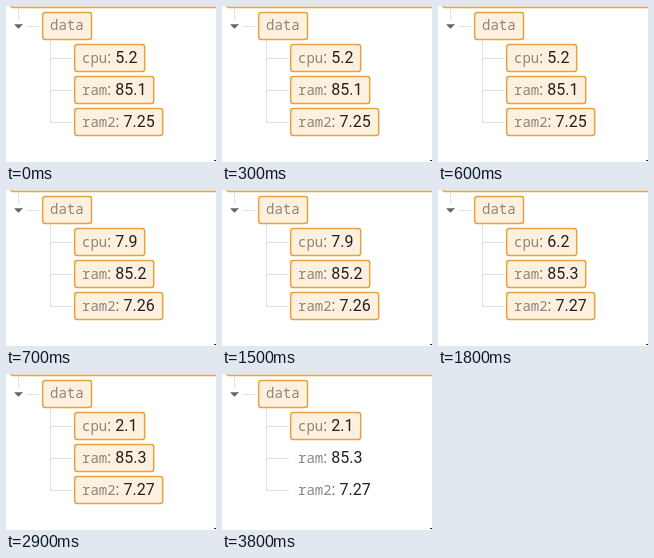
An HTML page that plays this animation: 210x156 px, repeating every 4000 ms.

```html
<!DOCTYPE html>
<html lang="en">
<head>
<meta charset="utf-8">
<style>
html, body { margin: 0; width: 100%; height: 100%; overflow: hidden; background: #fff; }
svg { display: block; width: 100%; height: 100%; }
.box { fill: #fdf0de; stroke: #e8a43c; stroke-width: 1.5; }
.line { fill: none; stroke: #e0e0e0; }
.key { font: 14px "Noto Sans Mono", monospace; fill: #8c857c; }
.val { font: 16px Roboto, sans-serif; fill: #212121; }
.colon { fill: #666; }
</style>
</head>
<body>
<svg viewBox="0 0 210 156">
  <path class="line" d="M12.5 3V14M22 20.5H33M44.5 34V116.5H67M44.5 52.5H67M44.5 84.5H67"/>
  <rect class="box" x="4.5" y="-24" width="230" height="25.4" rx="2.5"/>
  <path d="M8 18.3H17L12.5 22.8Z" fill="#666"/>
  <rect class="box" x="36.7" y="6.6" width="48.8" height="27" rx="2.5"/>
  <text class="key" x="44" y="24">data</text>
  <g id="rows"></g>
  <rect x="208" y="154" width="2" height="1" fill="#222"/>
</svg>
<script>
const LOOP = 4000;
const ROWS = [
  { key: 'cpu', width: 70, off: LOOP, vals: [[0, '5.2'], [700, '7.9'], [1800, '6.2'], [2900, '2.1']] },
  { key: 'ram', width: 79, off: 3800, vals: [[0, '85.1'], [700, '85.2'], [1800, '85.3']] },
  { key: 'ram2', width: 88, off: 3800, vals: [[0, '7.25'], [700, '7.26'], [1800, '7.27']] }
];
const CHAR = 8.4;

function add(parent, tag, attrs, text = '') {
  const el = document.createElementNS('http://www.w3.org/2000/svg', tag);
  for (const name in attrs) el.setAttribute(name, attrs[name]);
  el.textContent = text;
  return parent.appendChild(el);
}

const group = document.getElementById('rows');
ROWS.forEach((row, i) => {
  const y = 57 + i * 32;
  const end = 76 + row.key.length * CHAR;
  row.box = add(group, 'rect', { class: 'box', x: 68.7, y: y - 18.4, width: row.width, height: 27, rx: 2.5 });
  add(group, 'text', { class: 'key', x: 76, y }, row.key);
  add(group, 'text', { class: 'val colon', x: end, y }, ':');
  row.label = add(group, 'text', { class: 'val', x: end + 8, y });
});

function draw(t) {
  for (const row of ROWS) {
    const value = row.vals.filter(v => v[0] <= t).pop()[1];
    if (row.label.textContent !== value) row.label.textContent = value;
    row.box.setAttribute('visibility', t < row.off ? 'visible' : 'hidden');
  }
}

const start = performance.now();
function tick(now) {
  draw(Math.max(0, now - start) % LOOP);
  requestAnimationFrame(tick);
}
draw(0);
requestAnimationFrame(tick);
</script>
</body>
</html>
```
